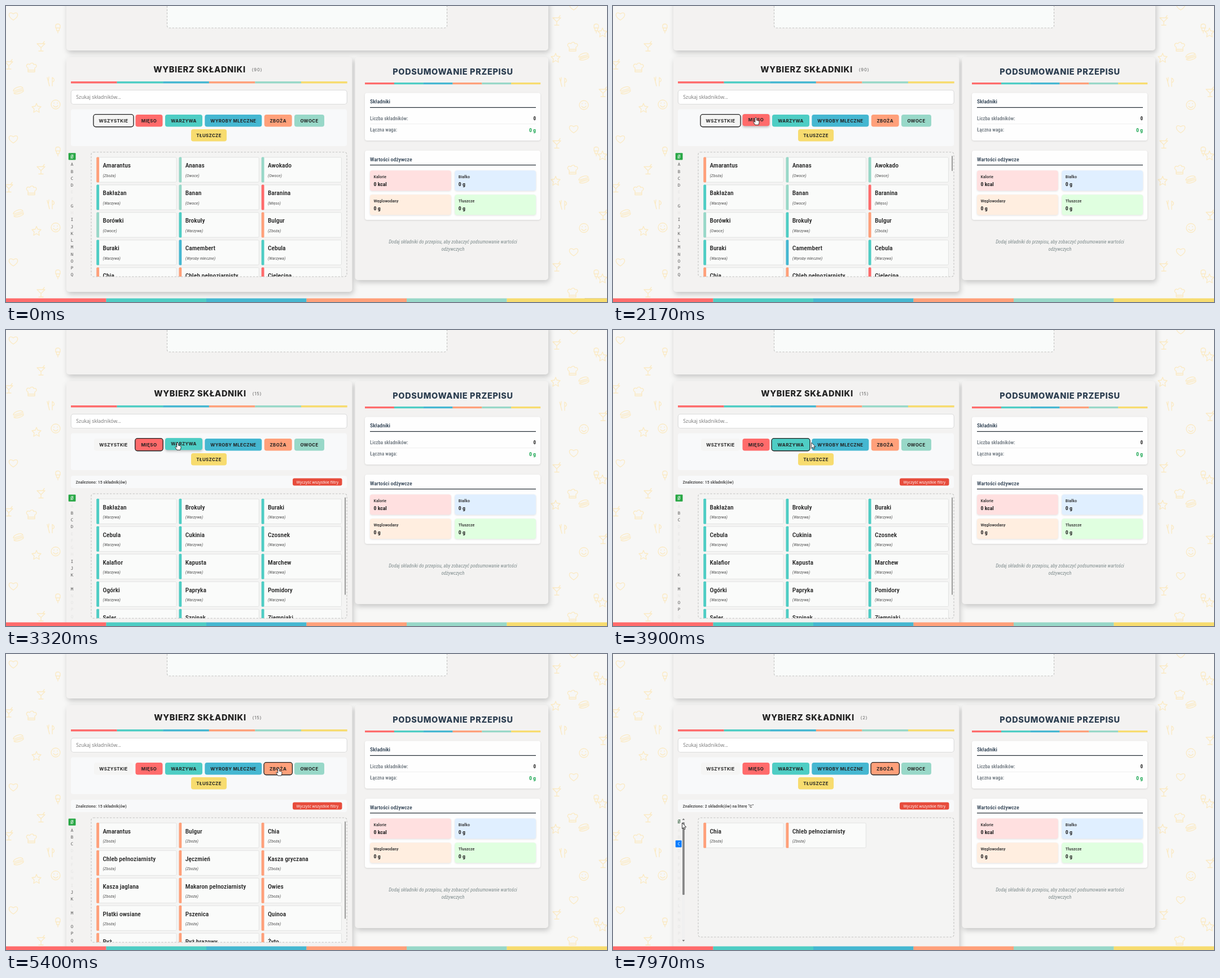
Write an HTML page that moves like this. It is 1065x526 px and loops after 8000 ms.

```html
<!DOCTYPE html>
<html lang="pl">
<head>
<meta charset="utf-8">
<title>Wybierz składniki</title>
<style>
html, body { margin: 0; width: 100%; height: 100%; overflow: hidden; background: #f7f7f6; }
svg { display: block; width: 100%; height: 100%; }
text { font-family: "Roboto Condensed", Roboto, sans-serif; font-stretch: 75%; fill: #222; }
.wide text { letter-spacing: -.05em; }
text.title { font: 800 14.5px Inter, sans-serif; letter-spacing: .66px; text-anchor: middle; }
text.count { font: 500 7.6px Inter, sans-serif; letter-spacing: .9px; text-anchor: middle; fill: #777; }
text.button { font: 700 7.8px Inter, sans-serif; letter-spacing: .4px; text-anchor: middle; }
text.search { font: 8.7px "Open Sans", sans-serif; letter-spacing: 0; fill: #757575; }
text.clear { font: 6.9px "Open Sans", sans-serif; letter-spacing: 0; fill: #fff; text-anchor: middle; }
text.letter { font: 7.4px "DejaVu Sans Mono", monospace; letter-spacing: 0; text-anchor: middle; }
.name { font-size: 11.54px; font-weight: 500; }
.kind { font-size: 7.8px; font-style: italic; fill: #555; }
.found { font-size: 8px; font-weight: 500; fill: #444; }
.head { font-size: 9.77px; font-weight: 500; fill: #2c3e50; }
.row { font-size: 8.88px; font-weight: 500; fill: #6c757d; }
.value { font-size: 9.77px; font-weight: 700; }
.label { font-size: 8px; font-weight: 500; fill: #333; }
.hint { font-size: 8.88px; font-style: italic; fill: #7f8c8d; text-anchor: middle; }
.panel { fill: #f3f2f1; filter: drop-shadow(2px 4px 5px rgba(0,0,0,.2)); }
.soft { filter: drop-shadow(0 1px 1.5px rgba(0,0,0,.12)); }
.lift { filter: drop-shadow(0 2px 2px rgba(0,0,0,.25)); }
.dash { stroke: #c4c4c2; stroke-width: 1.1; stroke-dasharray: 3.4 2.4; }
#pattern { fill: none; stroke: #fbeac3; stroke-width: 1.3; stroke-linecap: round; stroke-linejoin: round; }
#cursor path { fill: #fff; stroke: #111; stroke-width: .8; stroke-linejoin: round; }
</style>
</head>
<body>
<svg viewBox="0 0 1065 526" preserveAspectRatio="none">
  <defs>
    <path id="heart" d="M0 7C-13-1-7-10 0-4C7-10 13-1 0 7Z"/>
    <path id="hat" d="M-6 7V0C-12-3-7-9-3-6C-1-10 4-9 4-6C9-8 11-2 6 0V7ZM-6 4H6"/>
    <path id="fork" d="M-6-7L-4 0L-2 8M-3-8L-4 0M3 8V-7C8-4 7 0 3 1"/>
    <path id="bun" d="M-9 1C-9-4 5-10 8-4ZM-8 3L9-2M-8 5C-4 9 10 3 9 0Z"/>
    <path id="star" d="M0-8L2-3L8-2L4 2L5 8L0 5L-5 8L-4 2L-8-2L-2-3Z"/>
    <path id="smile" d="M-8 0A8 8 0 1 0 8 0A8 8 0 1 0-8 0M-4 2Q0 7 4 2M-3-3V-2M3-3V-2"/>
    <path id="glass" d="M-7-5H7L0 2ZM0 2V8M-4 8H4M3-5L6-9"/>
    <path id="ice" d="M-4-1V-5C-4-9 4-9 4-5V-1ZM-3-1L-2 4H2L3-1M0 4V8"/>
    <clipPath id="listClip"><rect x="151" y="260" width="453" height="221"/></clipPath>
  </defs>
  <rect width="1065" height="526" fill="#f7f7f6"/>
  <g id="pattern"></g>
  <rect class="panel" x="107" y="-10" width="854" height="89" rx="5"/>
  <rect class="panel" id="picker" x="107" y="91" width="506.5" height="417" rx="5"/>
  <rect class="panel" x="618.5" y="91" width="342.5" height="396" rx="5"/>
  <g id="fixed"></g>
  <g id="live"></g>
  <g id="footer"></g>
  <g id="cursor"><path id="hand" d="M-1.3 1Q0-1 1.3 1V5L5 6Q6.6 6.6 6 9L5 13.2H-1.2L-4 8.8Q-4.4 6.8-2.8 7.2L-1.3 8.6Z"/><path id="arrow" d="M0 0V10.4L2.4 8.3L4 11.8L5.7 11L4.1 7.6H7.2Z"/></g>
</svg>
<script>
const $ = id => document.getElementById(id);
const text = (x, y, s, cls, extra = '') => `<text x="${x}" y="${y}" class="${cls}" ${extra}>${s}</text>`;
const box = (x, y, w, h, fill, rx = 0, extra = '') =>
  `<rect x="${x}" y="${y}" width="${w}" height="${h}" fill="${fill}" rx="${rx}" ${extra}/>`;
const clamp = v => Math.max(0, Math.min(1, v));
const inside = (p, x, y, w, h) => p.x >= x && p.x < x + w && p.y >= y && p.y < y + h;

// Without a condensed face, tighten the spacing instead.
const pen = document.createElement('canvas').getContext('2d');
const widthIn = font => (pen.font = font, pen.measureText('Chleb pełnoziarnisty').width);
const regular = widthIn('100px Roboto, sans-serif');
if (widthIn('condensed 100px "Roboto Condensed", Roboto, sans-serif') > regular * .97)
  document.body.classList.add('wide');

const kinds = {
  all: { label: 'WSZYSTKIE', color: '#f5f5f4', x: 156, w: 69 },
  m: { label: 'MIĘSO', kind: 'Mięso', color: '#ff6b6b', x: 229.5, w: 48 },
  w: { label: 'WARZYWA', kind: 'Warzywa', color: '#4ecdc4', x: 282, w: 66 },
  d: { label: 'WYROBY MLECZNE', kind: 'Wyroby mleczne', color: '#45b7d1', x: 352.3, w: 101 },
  z: { label: 'ZBOŻA', kind: 'Zboża', color: '#ffa07a', x: 457.7, w: 49 },
  o: { label: 'OWOCE', kind: 'Owoce', color: '#98d8c8', x: 511, w: 53 },
  t: { label: 'TŁUSZCZE', kind: 'Tłuszcze', color: '#f7dc6f', x: 328, w: 63, y: 219 }
};
const palette = 'mwdzot'.split('').map(k => kinds[k].color);

const names = {
  all: 'Amarantus,Ananas,Awokado,Bakłażan,Banan,Baranina,Borówki,Brokuły,Bulgur,Buraki,Camembert,Cebula,Chia,Chleb pełnoziarnisty,Cielęcina',
  m: 'Baranina,Cielęcina,Dorsz,Indyk,Jagnięcina,Kaczka,Królik,Kurczak,Łosoś,Makrela,Sardynki,Szynka,Tuńczyk,Wieprzowina,Wołowina',
  w: 'Bakłażan,Brokuły,Buraki,Cebula,Cukinia,Czosnek,Kalafior,Kapusta,Marchew,Ogórki,Papryka,Pomidory,Seler,Szpinak,Ziemniaki',
  d: 'Camembert,Jogurt naturalny,Kefir,Masło,Mleko,Mleko kokosowe,Mozzarella,Parmezan,Ricotta,Ser cottage,Ser feta,Ser pleśniowy,Ser żółty,Śmietana,Twaróg',
  z: 'Amarantus,Bulgur,Chia,Chleb pełnoziarnisty,Jęczmień,Kasza gryczana,Kasza jaglana,Makaron pełnoziarnisty,Owies,Płatki owsiane,Pszenica,Quinoa,Ryż,Ryż brązowy,Żyto',
  c: 'Chia,Chleb pełnoziarnisty'
};
const mixedKinds = 'zoowomowzwdwzzm';

const views = [
  { at: -999, list: 'all', tab: 'all', letters: 'ABCDGIJKLMNOPQ', count: 90, titleX: 343 },
  { at: 2340, list: 'm', tab: 'm', letters: 'BCDIJKM', count: 15, titleX: 344 },
  { at: 3300, list: 'w', tab: 'w', letters: 'BCKMOP', count: 15, titleX: 344 },
  { at: 4220, list: 'd', tab: 'd', letters: 'CJKMP', count: 15, titleX: 344 },
  { at: 5180, list: 'z', tab: 'z', letters: 'ABCJKMOPQ', count: 15, titleX: 344 },
  { at: 6960, list: 'c', tab: 'z', letters: 'C', count: 2, titleX: 346, picked: 'C' }
];
const viewAt = t => views.filter(v => v.at <= t).pop();

// Pointer stops: time, x, y
const stops = [
  [0, 1066, 534], [70, 1052, 519], [870, 402, 391], [940, 396, 386], [1690, 252, 230],
  [2030, 253, 198], [2700, 253, 198], [3250, 304, 200], [3540, 304, 200], [4180, 384, 200],
  [4450, 384, 200], [5100, 483, 203], [5540, 483, 203], [6350, 130, 325], [6480, 122, 331.5],
  [6690, 118, 336], [7600, 118, 336], [7940, 122.5, 300], [8001, 122.5, 300]
];
function pointerAt(t) {
  const i = stops.findIndex(s => s[0] > t), [t0, x0, y0] = stops[i - 1], [t1, x1, y1] = stops[i];
  const u = (t - t0) / (t1 - t0), k = u * u * (3 - 2 * u);
  return { x: x0 + (x1 - x0) * k, y: y0 + (y1 - y0) * k };
}

function stripe(x, y, w, h, rx) {
  const part = w / 6;
  const bars = palette.map((c, i) => box(x + i * part, y, part + .2, h, c)).join('');
  return bars + (rx ? '' : '');
}

function drawPattern() {
  const icons = [
    ['heart', 13, 18], ['ice', 92, 40], ['glass', 62, 72], ['hat', 45, 110], ['glass', 5, 104],
    ['fork', 79, 134], ['bun', 22, 150], ['star', 54, 181], ['smile', 88, 175],
    ['heart', 1006, 0], ['star', 1057, 47], ['hat', 1004, 73], ['bun', 1024, 90], ['ice', 1046, 40],
    ['fork', 987, 135], ['glass', 1058, 153], ['smile', 1024, 176], ['star', 974, 92], ['glass', 976, 26]
  ];
  $('pattern').innerHTML = [0, 218.5, 437].map(dy => icons.map(([id, x, y]) =>
    `<use href="#${id}" x="${x}" y="${y + dy}"/>`).join('')).join('');
}

function drawFixed() {
  const tiles = [['Kalorie', '0 kcal', '#ffe0e0'], ['Białko', '0 g', '#e0efff'],
    ['Węglowodany', '0 g', '#ffeee0'], ['Tłuszcze', '0 g', '#e0ffe0']];
  const right = 'text-anchor="end"';
  $('fixed').innerHTML =
    box(285.5, -10, 496, 49, '#f9fbfa', 4, 'class="dash"') +
    stripe(115, 134, 489.5, 3.5) + stripe(636, 136, 311, 3.3) +
    box(115.3, 149.5, 489, 25, '#fff', 4.5, 'stroke="#dcdcdc" stroke-width="1.2"') +
    text(124.3, 165, 'Szukaj składników...', 'search') +
    box(115, 183.5, 489, 65.5, '#f8f9fa', 4) +
    text(792, 121.8, 'PODSUMOWANIE PRZEPISU', 'title', 'style="fill:#2c3e50"') +
    box(636, 154.5, 311, 84.5, '#fefefe', 4, 'class="soft"') +
    text(645, 173.2, 'Składniki', 'head') + box(645, 179.8, 294, 1.2, '#222b33') +
    text(645, 202.6, 'Liczba składników:', 'row') + text(939, 202.6, '0', 'value', right + ' style="font-size:8.88px"') +
    box(645, 209, 294, .6, '#e8e8e8') +
    text(645, 223.4, 'Łączna waga:', 'row') + text(939, 223.6, '0 g', 'value', right + ' style="fill:#1fa855"') +
    box(636, 257, 311, 123, '#fefefe', 4, 'class="soft"') +
    text(645, 275.5, 'Wartości odżywcze', 'head') + box(645, 282, 294, 1.2, '#222b33') +
    tiles.map(([label, value, color], i) => {
      const x = 645 + i % 2 * 150.3, y = 292.3 + (i >> 1) * 43;
      return box(x, y, 143.7, 36, color, 4, 'class="soft"') +
        text(x + 6.5, y + 13.8, label, 'label') + text(x + 6.5, y + 27.2, value, 'value');
    }).join('') +
    text(792, 421.6, 'Dodaj składniki do przepisu, aby zobaczyć podsumowanie wartości', 'hint') +
    text(792, 435, 'odżywczych', 'hint');
  $('footer').innerHTML = stripe(0, 519.5, 1065, 7);
}

function drawButton(key, t, view, p) {
  const { label, color, x, w, y = 193 } = kinds[key];
  const previous = views[views.indexOf(view) - 1];
  const fade = clamp((t - view.at - 20) / 180);
  const was = previous && previous.tab === key ? 1 : 0, is = view.tab === key ? 1 : 0;
  const active = was + (is - was) * fade;
  const hover = inside(p, x, y, w, 21.5) ? 1 - active : 0;
  const cx = x + w / 2, cy = y + 10.7;
  return `<g transform="translate(${cx} ${cy - hover * 1.1}) scale(${1 + active * .03})">` +
    box(-w / 2, -10.7, w, 21.4, color, 4, `stroke="#222" stroke-width="1.3" stroke-opacity="${active}"` + (hover > .1 ? ' class="lift"' : '')) +
    text(0, 2.8, label, 'button') + '</g>';
}

function drawCard(name, i, view, top, p) {
  const { kind, color } = kinds[view.list === 'all' ? mixedKinds[i] : view.tab];
  const x = 160.3 + i % 3 * 146.2, y = top + 8.7 + Math.floor(i / 3) * 49;
  const hover = inside(p, x, y, 142, 45);
  return `<g transform="translate(${x} ${y - (hover ? 1 : 0)})">` +
    box(.5, .5, 141.3, 44.2, '#fafbfa', 2, `stroke="#e2e3e2" stroke-width="1"` + (hover ? ' class="lift"' : '')) +
    box(0, 0, 4.8, 45, color, 1.5) +
    text(11.2, 18.9, name, 'name') + text(11.2, 35.8, `(${kind})`, 'kind') + '</g>';
}

function drawLetters(t, view, top) {
  const shown = viewAt(t - 75);
  let out = shown.picked ? text(117, top + 9.8, 'Ø', 'letter', 'style="font-size:8.5px;fill:#2b5a38"') :
    box(110.7, top + 1.6, 12.8, 12.2, '#28a745', 1) +
    text(117, top + 10.9, 'Ø', 'letter', 'style="font-size:9px;fill:#fff"');
  [...'ABCDEFGHIJKLMNOPQ'].forEach((c, i) => {
    const y = top + 24.7 + i * 12.25;
    const picked = shown.picked === c;
    const fill = picked ? '#fff' : shown.letters.includes(c) ? '#555' : '#e4e4e3';
    if (picked) out += box(110.8, y - 9, 10.8, 12.3, '#007bff', 1);
    out += text(117, y, c, 'letter', `style="fill:${fill}"`);
  });
  const thin = clamp((t - 6400) / 250), full = clamp((t - 7700) / 200);
  if (full) out += box(122.4, top + .5, 5, 221, '#f0f0f0', 0, `opacity="${full}"`) +
    `<path d="M122.6 ${top + 4}l2.3-3l2.3 3zM122.6 ${top + 217}l2.3 3l2.3-3z" fill="#777" opacity="${full}"/>`;
  if (thin) out += box(124.5 - full * 1.4, top + 8, 1.4 + full * 2.3, 129, full ? '#858585' : '#ddd', 1, `opacity="${thin}"`);
  return out;
}

let lastLive = '';
function render(t) {
  const view = viewAt(t), p = pointerAt(t);
  const filtered = view.list !== 'all', top = filtered ? 291 : 259.7;
  const height = view.picked ? 212 : 221.3;
  const clip = `<clipPath id="inner"><rect x="152" y="${top}" width="452" height="${height}"/></clipPath>`;
  let out = clip +
    text(view.titleX, 118.4, 'WYBIERZ SKŁADNIKI', 'title') +
    text(445, 116, `(${view.count})`, 'count') +
    Object.keys(kinds).map(k => drawButton(k, t, view, p)).join('');
  if (filtered) out += box(115, 259, 489, 22, '#f8f9fa', 4) +
    text(123.6, 273, view.picked ? 'Znaleziono: 2 składnik(ów) na literę "C"' : 'Znaleziono: 15 składnik(ów)', 'found') +
    box(508, 263.4, 87.5, 13.2, '#e74c3c', 3) + text(551.8, 272.6, 'Wyczyść wszystkie filtry', 'clear');
  out += box(151, top, 453, height, '#f4f4f3', 4) +
    '<g clip-path="url(#inner)">' +
    names[view.list].split(',').map((n, i) => drawCard(n, i, view, top, p)).join('') + '</g>' +
    box(151, top, 453, height, 'none', 4, 'class="dash"');
  if (t > 520 && !view.picked) out += box(600.4, top + 6.5, 1.3, filtered ? 173 : 27, '#6a6a6a', .6);
  out += drawLetters(t, view, top);
  if (t < 130) out += box(1026, 519.5, 45, 12, '#f4f4f4', 0, 'stroke="#bbb" stroke-width=".8"') +
    text(1029, 529, 'Narzędzia', 'label');

  if (out !== lastLive) $('live').innerHTML = lastLive = out;
  $('picker').setAttribute('height', filtered ? 448 : 417);

  const onButton = Object.values(kinds).some(k => inside(p, k.x, k.y || 193, k.w, 21.5));
  const onCard = inside(p, 160, top + 8, 435, height - 8);
  const onLetter = p.x < 120.5;
  const pointing = onButton || onCard || onLetter;
  $('hand').style.display = pointing ? '' : 'none';
  $('arrow').style.display = pointing ? 'none' : '';
  $('cursor').setAttribute('transform', `translate(${p.x} ${p.y})`);
}

drawPattern();
drawFixed();
$('footer').after($('cursor'));
(function tick() {
  render(performance.now() % 8000);
  requestAnimationFrame(tick);
})();
</script>
</body>
</html>
```
